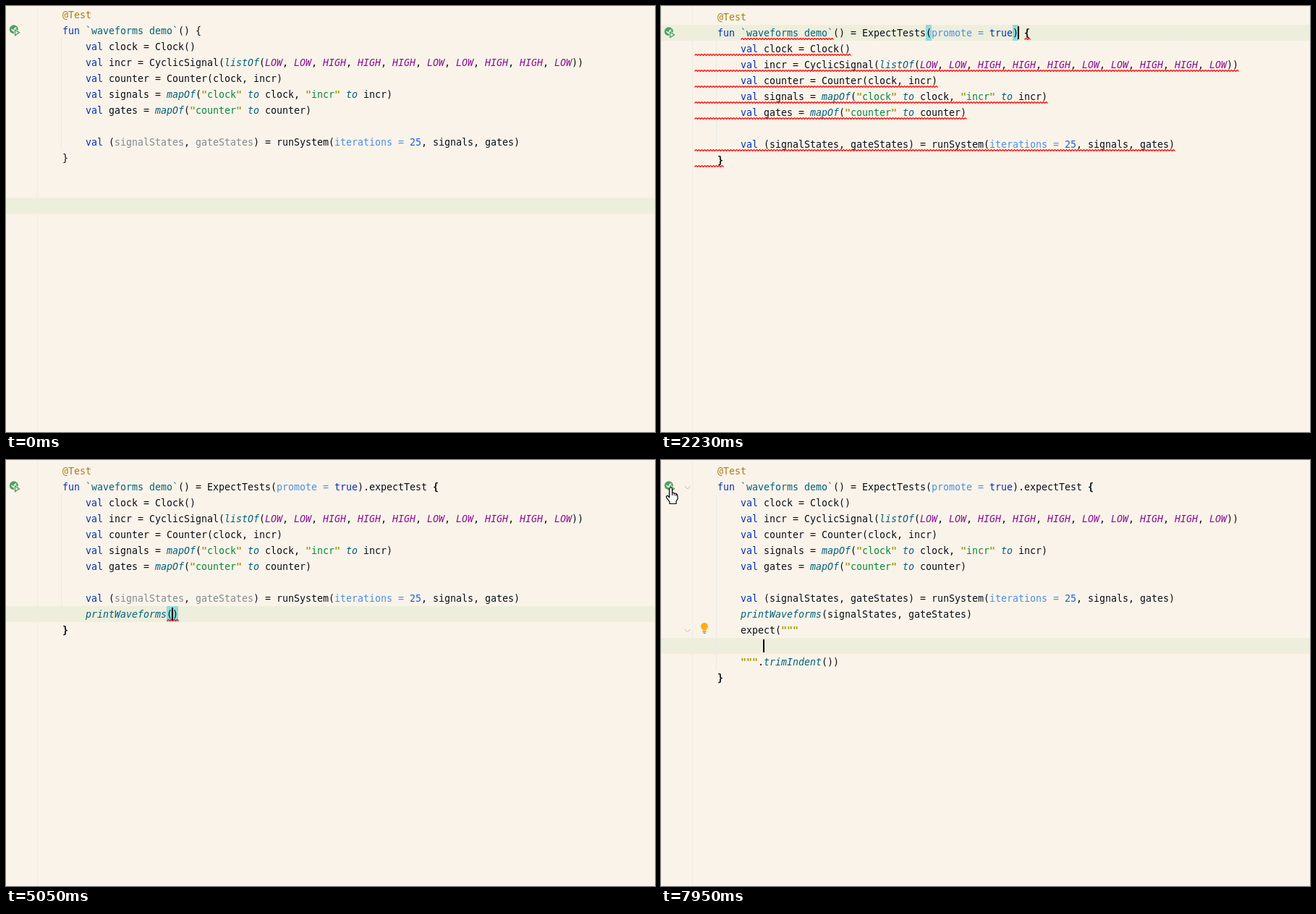
Animation of 897x589 px, one loop 8 s. Source, as an HTML page with a canvas:

```html
<!DOCTYPE html>
<html lang="en">
<head>
<meta charset="utf-8">
<title>Editor typing</title>
<style>
  html, body { margin: 0; width: 100%; height: 100%; overflow: hidden; background: #faf3e9; }
  canvas { display: block; }
</style>
</head>
<body>
<canvas id="stage" width="897" height="589"></canvas>
<script>
const ctx = document.getElementById('stage').getContext('2d');
const LOOP = 8000, CELL = 8, ROW = 22, LEFT = 78, TOP = 4;
const PAPER = '#faf3e9', INK = '#080f18', RED = '#ff0000';
const MONO = '13.29px "DejaVu Sans Mono", "Noto Sans Mono", monospace';
const colX = col => LEFT + col * CELL;
const rowY = row => TOP + row * ROW;

// Syntax rules: pattern, colour, font style
const RULES = [
  [/@\w+/, '#a87f14'],
  [/`[^`]*`/, '#00627a'],
  [/"+/, '#a09a0c', 'bold'],
  [/(?<=")\w+(?=")/, '#07883f'],
  [/\b(?:fun|val|true)\b/, '#0033b3'],
  [/\b(?:listOf|mapOf|to|printWaveforms|trimIndent)\b/, '#00627a', 'italic'],
  [/\b(?:LOW|HIGH)\b/, '#871094', 'italic'],
  [/\b(?:iterations|promote) =/, '#4a90e6'],
  [/\b\d+/, '#1764dc'],
  [/\w+|\S/, INK],
];
const TOKEN = new RegExp(RULES.map(([re]) => `(${re.source})`).join('|'), 'g');

const BODY = [
  '    val clock = Clock()',
  '    val incr = CyclicSignal(listOf(LOW, LOW, HIGH, HIGH, HIGH, LOW, LOW, HIGH, HIGH, LOW))',
  '    val counter = Counter(clock, incr)',
  '    val signals = mapOf("clock" to clock, "incr" to incr)',
  '    val gates = mapOf("counter" to counter)',
  '',
  '    val (signalStates, gateStates) = runSystem(iterations = 25, signals, gates)',
];
const SUFFIXES = ['Signal', 'States', 'Gates', 'Clock', 'System', 'Counter', 'Values', 'Edges', 'Inputs', 'Outputs', 'Steps'];

// Completion list under a cell; without a first entry it is still loading
const list = (row, col, rows, first, stem, width = 570) => ({ row, col, rows, first, stem, width });

const call = args => ` = ExpectTests(${args}`;
const dotted = name => call('promote = true).' + name);
const print = args => ['    printWaveforms(' + args];
const printed = '    printWaveforms(signalStates, gateStates)';

// Each step overrides part of the state; "|" in the text marks the caret
const STEPS = [
  [0, { dy: -3, head: '', tail: [], unused: 'signalStates gateStates' }],
  [100, { dy: 0, head: '|', bold: true }],
  [195, { head: ' |' }],
  [290, { head: ' =|' }],
  [385, { head: ' = |' }],
  [480, { head: ' = E|', popup: list(1, 25, 1, '', '', 540) }],
  [575, { head: ' = Ex|', popup: list(1, 25, 11.5, 'ExpectTests', 'Ex', 540) }],
  [670, { head: ' = Exp|' }],
  [765, { head: ' = Expe|' }],
  [860, { head: ' = Expec|', popup: list(1, 25, 4, 'ExpectTests', 'Expect', 540) }],
  [960, { errors: true, unused: '' }],
  [1060, { head: ' = ExpectTests|', popup: null }],
  [1255, { head: call('|)') }],
  [1450, { head: call('p|)'), popup: list(1, 37, 1) }],
  [1550, { head: call('pr|)'), popup: list(1, 37, 11.5, 'promote =', 'pr') }],
  [1650, { head: call('pro|)') }],
  [1750, { head: call('promote = |)'), popup: null }],
  [1940, { head: call('promote = t|)'), popup: list(1, 47, 4, 'true', 't') }],
  [2040, { head: call('promote = tr|)') }],
  [2230, { head: call('promote = true)|'), popup: null }],
  [2420, { head: dotted('|'), popup: list(1, 53, 1) }],
  [2520, { head: dotted('e|'), popup: list(1, 53, 8, 'expectTest', 'e') }],
  [2810, { head: dotted('ex|') }],
  [2900, { head: dotted('expectTest|'), popup: null, errors: false }],
  [3070, { head: dotted('expectTest'), at: [1, 65] }],
  [3170, { at: [2, 23] }],
  [3270, { at: [3, 65] }],
  [3370, { at: [4, 38] }],
  [3470, { at: [5, 57] }],
  [3650, { at: [6, 43], unused: 'signalStates gateStates' }],
  [3750, { at: [8, 79] }],
  [3940, { tail: ['    |'] }],
  [4140, { bulb: 8 }],
  [4330, { tail: ['    p|'], bulb: 0, popup: list(9, 4, 1) }],
  [4420, { tail: ['    pr|'], popup: list(9, 4, 11.5, 'printWaveforms', 'pr') }],
  [4710, { tail: ['    print|'] }],
  [4790, { tail: ['    printW|'], popup: list(9, 4, 1, 'printWaveforms') }],
  [4970, { tail: print('|)'), popup: null }],
  [5050, { missing: true }],
  [5240, { tail: print('s|)'), missing: false, popup: list(9, 19, 1) }],
  [5340, { tail: print('si|)'), popup: list(9, 19, 11.5, 'signalStates', 'si') }],
  [5440, { tail: print('sig|)') }],
  [5540, { tail: print('signalStates|)'), popup: null, unused: 'gateStates' }],
  [5640, { tail: print('signalStates, |)') }],
  [5740, { tail: print('signalStates, g|)'), popup: list(9, 33, 1) }],
  [5840, { tail: print('signalStates, ga|)'), popup: list(9, 33, 11.5, 'gateStates', 'ga') }],
  [5940, { tail: print('signalStates, gat|)') }],
  [6050, { tail: print('signalStates, gateStates|)'), popup: null }],
  [6240, { tail: print('signalStates, gateStates)|'), unused: '' }],
  [6340, { tail: [printed, '    |'] }],
  [6530, { tail: [printed, '    e|'], popup: list(10, 4, 1) }],
  [6640, { tail: [printed, '    ex|'], popup: list(10, 4, 11.5, 'expect', 'ex') }],
  [6740, { tail: [printed, '    exp|'] }],
  [6840, { tail: [printed, '    expect(|)'], popup: null }],
  [6940, { tail: [printed, '    expect("|")'] }],
  [7040, { tail: [printed, '    expect(""|)'] }],
  [7140, { tail: [printed, '    expect("""|""")'] }],
  [7330, { tail: [printed, '    expect("""', '        |', '    """.trimIndent())'] }],
  [7640, { bulb: 10 }],
  [7740, { beam: [284, 262] }],
  [7840, { beam: [120, 140] }],
  [7950, { beam: null, hand: [14, 38] }],
];

function stateAt(time) {
  const s = Object.assign({}, ...STEPS.filter(([t]) => t <= time).map(([, change]) => change));
  const raw = ['@Test', 'fun `waveforms demo`()' + s.head + ' {', ...BODY, ...s.tail, '}'];
  const row = raw.findIndex(line => line.includes('|'));
  s.caret = row >= 0 ? [row, raw[row].indexOf('|')] : s.at;
  s.lines = raw.map(line => line.replace('|', ''));
  return s;
}

function rect(x, y, w, h, color) {
  ctx.fillStyle = color;
  ctx.fillRect(x, y, w, h);
}

function text(str, x, y, color, font = MONO) {
  ctx.font = font;
  ctx.fillStyle = color;
  ctx.fillText(str, x, y);
}

function stroke(path, color, width = 1) {
  ctx.strokeStyle = color;
  ctx.lineWidth = width;
  ctx.stroke(path);
}

function squiggle(x1, x2, row) {
  const path = new Path2D(), y = rowY(row) + 18.5;
  for (let x = x1, i = 0; x <= x2; x += 2, i++) path.lineTo(x + 0.5, y + (i % 2 ? 0 : 2));
  stroke(path, RED, 1.2);
}

function drawCode(s) {
  s.lines.forEach((line, row) => {
    for (const match of line.matchAll(TOKEN)) {
      const word = match[0];
      let [, color, style = ''] = RULES[match.slice(1).findIndex(Boolean)];
      if (row === 8 && s.unused.split(' ').includes(word)) color = '#828a90';
      if (s.bold && /[{}]/.test(word)) style = 'bold';
      text(word, colX(match.index), rowY(row) + 16, color, `${style} ${MONO}`);
    }
  });
}

// Cells of the bracket pair that closes or opens just before the caret
function bracketPair({ lines, caret: [row, col] }) {
  const line = lines[row], last = col - 1;
  if (line[last] === '{') return [[row, last], [lines.length - 1, 0]];
  const dir = { '(': 1, ')': -1 }[line[last]];
  if (!dir) return [];
  let depth = 0;
  for (let i = last; i >= 0 && i < line.length; i += dir) {
    depth += line[i] === '(' ? 1 : line[i] === ')' ? -1 : 0;
    if (!depth) return [[row, last], [row, i]];
  }
  return [];
}

function drawErrors(s) {
  if (s.missing) squiggle(colX(18), colX(20), 9);
  if (!s.errors) return;
  const head = s.lines[1].length;
  squiggle(colX(4), colX(20), 1);
  squiggle(colX(head - 1), colX(head), 1);
  s.lines.forEach((line, row) => {
    if (row > 1 && line) squiggle(46, colX(line.length), row);
  });
}

function drawRunIcon() {
  const y = rowY(1) + 10;
  ctx.fillStyle = '#4fa065';
  ctx.beginPath();
  ctx.arc(10.8, y - 0.7, 6, 0, 7);
  ctx.fill();
  stroke(new Path2D(`M7.5 ${y - 1} l2.5 2.5 l4 -5`), '#fff', 1.4);
  const play = new Path2D(`M12.5 ${y} l6 3.8 l-6 3.8 z`);
  stroke(play, PAPER, 3);
  ctx.fillStyle = '#e9f5e6';
  ctx.fill(play);
  stroke(play, '#3d9856', 1.2);
}

function drawBulb(row) {
  const y = rowY(row) + 6;
  ctx.fillStyle = '#ffaf0f';
  ctx.beginPath();
  ctx.arc(60, y, 5, 0, 7);
  ctx.fill();
  rect(57.5, y + 3, 5, 3, '#ffaf0f');
  rect(57.5, y + 7, 5, 1, '#6c707e');
  rect(58.5, y + 9, 3, 1, '#6c707e');
}

function drawPopup({ row, col, rows, first, stem, width }) {
  const x = colX(col) - 24, y = rowY(row + 1), height = 30 + rows * 24;
  const box = new Path2D();
  box.roundRect(x + 1, y + 1, width - 2, height - 2, 6);
  ctx.save();
  ctx.shadowColor = 'rgba(40, 30, 40, .42)';
  ctx.shadowBlur = 44;
  ctx.shadowOffsetY = 22;
  ctx.fillStyle = PAPER;
  ctx.fill(box);
  ctx.restore();
  ctx.save();
  ctx.clip(box);
  if (first) {
    rect(x + 5, y + 4, width - 10, 24, '#d5e1f7');
    const names = [first, ...SUFFIXES.map(suffix => stem + suffix)];
    names.slice(0, Math.ceil(rows)).forEach((name, i) => text(name, x + 24, y + 21 + i * 24, INK));
    rect(x, y + height - 25, width, 25, PAPER);
    text('Press Enter to insert, Tab to replace', x + 12, y + height - 9, '#818594', '12px Inter, sans-serif');
  }
  ctx.restore();
  stroke(box, '#b9bccb', 2);
}

function drawHand([x, y]) {
  ctx.save();
  ctx.translate(x, y);
  const hand = new Path2D('M-2.5 1.5 Q-.5 -1.5 1.5 1.5 V7 L7 8.5 Q9 9.5 9 12 V16 L7 19 V22.5 H-2 V20 L-6.5 14 Q-7 11 -4.5 11.5 L-2.5 13.5 Z');
  ctx.fillStyle = '#fff';
  ctx.fill(hand);
  stroke(hand, '#000', 1.2);
  stroke(new Path2D('M1.5 7 V11 M4.2 8 V11 M6.8 9 V12'), '#000');
  ctx.restore();
}

function draw(time) {
  const s = stateAt(time);
  rect(0, 0, 897, 589, PAPER);
  rect(43, 0, 1, 589, '#efebe3');
  ctx.save();
  ctx.translate(0, s.dy);
  rect(0, rowY(s.caret ? s.caret[0] : 12), 897, ROW, '#eeeedc');
  rect(76, rowY(2), 1, rowY(s.lines.length - 1) - rowY(2), '#e6ebe4');
  if (s.caret) {
    for (const [row, col] of bracketPair(s)) rect(colX(col), rowY(row), CELL, ROW, '#93d9d9');
  }
  drawCode(s);
  drawErrors(s);
  drawRunIcon();
  if (s.bulb) drawBulb(s.bulb);
  if (s.caret) rect(colX(s.caret[1]) - 1, rowY(s.caret[0]) + 2, 2, 18, '#000');
  if (s.popup) drawPopup(s.popup);
  ctx.restore();
  if (s.beam) {
    const [x, y] = s.beam;
    stroke(new Path2D(`M${x - 3} ${y - 8} h6 m-3 0 v16 m-3 0 h6`), '#222');
  }
  if (s.hand) {
    for (const row of [1, 10]) stroke(new Path2D(`M32.5 ${rowY(row) + 10} l4 4 l4 -4`), '#b9b7b0');
    drawHand(s.hand);
  }
}

const start = performance.now();
function tick() {
  draw((performance.now() - start) % LOOP);
  requestAnimationFrame(tick);
}
tick();
</script>
</body>
</html>
```
